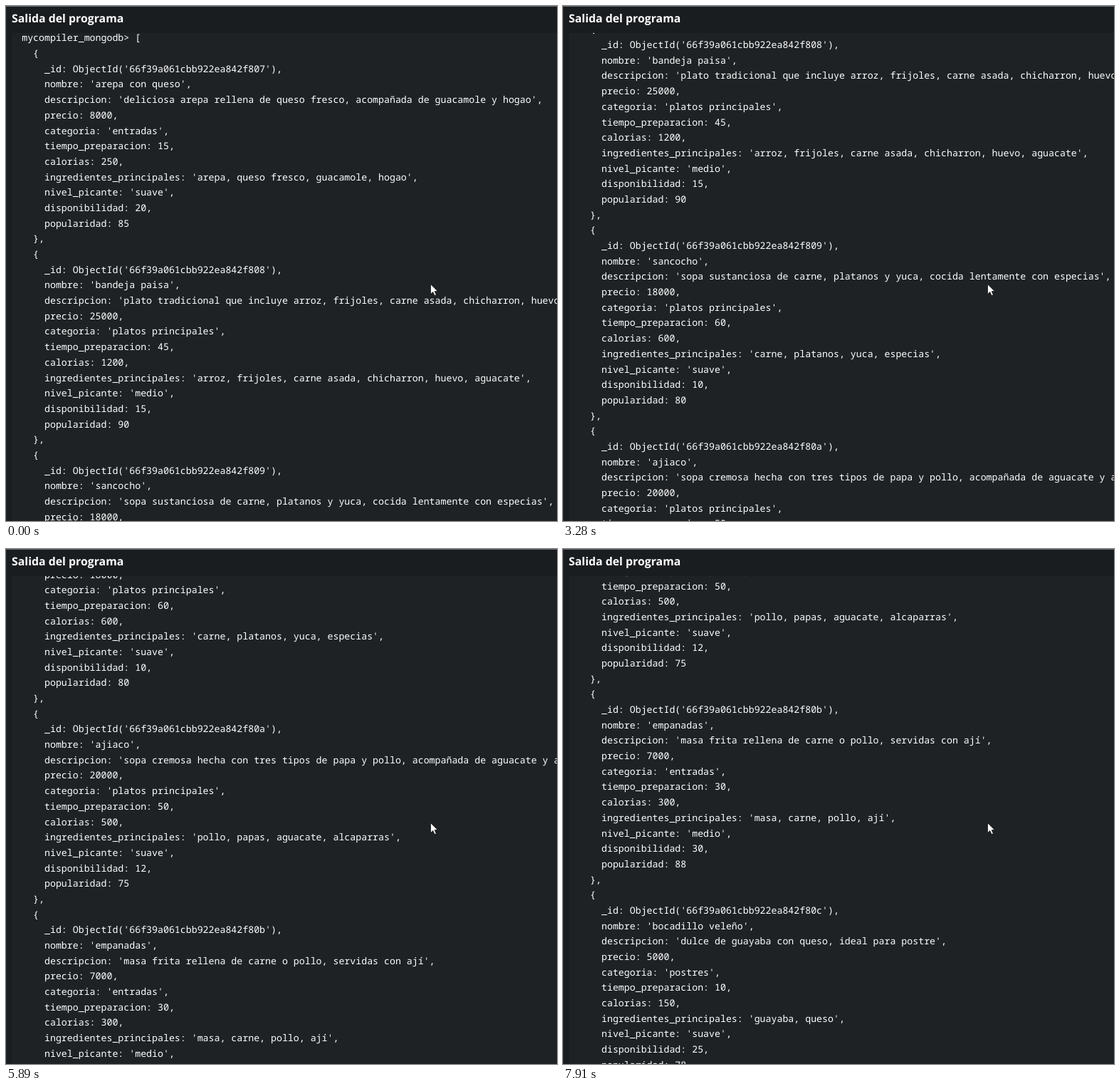
Recreate the animation shown at these times as an HTML page. Size 774 by 723 pixels, loop 8 s.

```html
<!DOCTYPE html>
<html lang="es">
<head>
<meta charset="utf-8">
<title>Salida del programa</title>
<style>
  html, body { margin: 0; width: 100%; height: 100%; overflow: hidden; background: #1a1d20; }
  body { position: relative; color: #fff; text-rendering: geometricPrecision; }
  h1 { position: absolute; left: 8px; top: 0; margin: 0; font: bold 15.85px/34px "Open Sans", sans-serif; white-space: nowrap; }
  #edge { position: absolute; inset: 0; border-top: 1px solid #686d71; border-left: 1px solid #24282b; }
  #panel { position: absolute; left: 8px; top: 38px; right: 0; bottom: 0; overflow: hidden; background: #1e2225; }
  pre { position: absolute; left: 14.2px; margin: 0; font: 500 13.25px/21.69px "Noto Sans Mono", monospace; }
  svg { position: absolute; left: 596px; overflow: visible; }
</style>
</head>
<body>
<div id="edge"></div>
<h1>Salida del programa</h1>
<div id="panel"><pre id="output"></pre></div>
<svg id="cursor" width="12" height="18">
  <path d="M.5 .5V14.6L3.8 11.5L6 16.6L8.4 15.6L6.2 10.6H10.4Z" fill="#fff" stroke="#111" stroke-width=".8"/>
</svg>
<script>
const fields = ['nombre', 'descripcion', 'precio', 'categoria', 'tiempo_preparacion', 'calorias',
  'ingredientes_principales', 'nivel_picante', 'disponibilidad', 'popularidad'];
const main = 'platos principales';
const dishes = [
  ['arepa con queso', 'deliciosa arepa rellena de queso fresco, acompañada de guacamole y hogao',
    8000, 'entradas', 15, 250, 'arepa, queso fresco, guacamole, hogao', 'suave', 20, 85],
  ['bandeja paisa', 'plato tradicional que incluye arroz, frijoles, carne asada, chicharron, huevo y aguacate',
    25000, main, 45, 1200, 'arroz, frijoles, carne asada, chicharron, huevo, aguacate', 'medio', 15, 90],
  ['sancocho', 'sopa sustanciosa de carne, platanos y yuca, cocida lentamente con especias',
    18000, main, 60, 600, 'carne, platanos, yuca, especias', 'suave', 10, 80],
  ['ajiaco', 'sopa cremosa hecha con tres tipos de papa y pollo, acompañada de aguacate y alcaparras',
    20000, main, 50, 500, 'pollo, papas, aguacate, alcaparras', 'suave', 12, 75],
  ['empanadas', 'masa frita rellena de carne o pollo, servidas con ají',
    7000, 'entradas', 30, 300, 'masa, carne, pollo, ají', 'medio', 30, 88],
  ['bocadillo veleño', 'dulce de guayaba con queso, ideal para postre',
    5000, 'postres', 10, 150, 'guayaba, queso', 'suave', 25, 78]
];

const quote = v => typeof v === 'string' ? `'${v}'` : v;
const record = (dish, i) => {
  const id = `_id: ObjectId('66f39a061cbb922ea842f8${(7 + i).toString(16).padStart(2, '0')}')`;
  const rows = [id, ...dish.map((v, k) => `${fields[k]}: ${quote(v)}`)];
  return `  {\n${rows.map(r => '    ' + r).join(',\n')}\n  }`;
};
const output = document.getElementById('output');
const cursor = document.getElementById('cursor');
output.textContent = 'mycompiler_mongodb> [\n' + dishes.map(record).join(',\n') + ',';

// Each swipe scrolls a distance in visible steps, easing in and out
const STEP = 125;
const swipes = [
  { start: 1300, duration: 750, distance: 46 },
  { start: 2080, duration: 625, distance: 264 },
  { start: 3280, duration: 1710, distance: 368 },
  { start: 5890, duration: 1250, distance: 115 },
  { start: 7410, duration: 1250, distance: 395 }
];
const smooth = p => p * p * (3 - 2 * p);

function travel(t, { start, duration, distance }) {
  if (t < start) return 0;
  const elapsed = STEP * (1 + Math.floor((t - start) / STEP));
  return distance * smooth(Math.min(1, elapsed / duration));
}

function draw() {
  const t = performance.now() % 8000;
  const scroll = swipes.reduce((sum, swipe) => sum + travel(t, swipe), 0);
  output.style.top = -3.6 - scroll + 'px';
  cursor.style.top = (t < 5890 ? 390 : 384) + 'px';
  requestAnimationFrame(draw);
}
draw();
</script>
</body>
</html>
```
